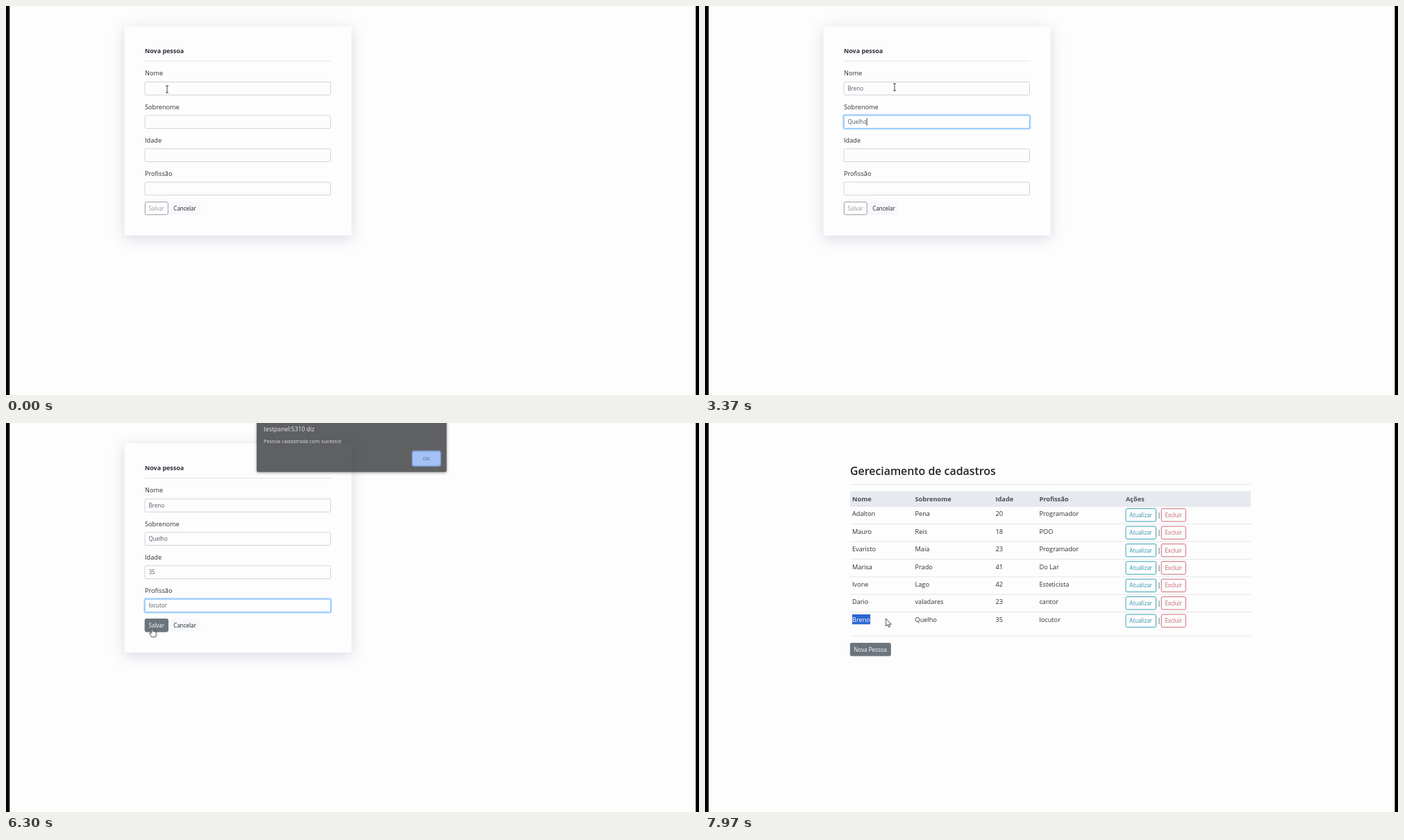
Recreate the animation shown at these times as an HTML page. Size 998 by 561 pixels, loop 8000 ms.

```html
<!DOCTYPE html>
<html lang="pt-BR">
<head>
<meta charset="utf-8">
<title>Nova pessoa</title>
<style>
  html, body { margin: 0; width: 100%; height: 100%; overflow: hidden; background: #fdfdfe; }
  svg { display: block; width: 998px; height: 561px; font: 9.18px "Open Sans", "Noto Sans", sans-serif; fill: #2b3035; }
  .small { font-size: 8.03px; }
  .mid { text-anchor: middle; }
  .bold { font-weight: 700; }
  .line { stroke: #e4e5e9; stroke-width: 1; }
  .card { fill: #fdfdfe; filter: drop-shadow(0 4.9px 9.8px rgba(40, 40, 90, .17)); }
  .popup { fill: #292a2d; filter: drop-shadow(0 1px 2px rgba(0, 0, 0, .5)); }
</style>
</head>
<body>
<svg id="stage" viewBox="0 0 998 561"></svg>
<script>
const LOOP = 8000, SWITCH = 7330;
const stage = document.getElementById('stage');
const tracks = [];

function make(parent, tag, attrs = {}, text) {
  const el = document.createElementNS('http://www.w3.org/2000/svg', tag);
  for (const k in attrs) el.setAttribute(k, attrs[k]);
  if (text !== undefined) el.textContent = text;
  return parent.appendChild(el);
}
const group = (parent, attrs) => make(parent, 'g', attrs);
const box = (parent, x, y, width, height, attrs) => make(parent, 'rect', { x, y, width, height, ...attrs });
const write = (parent, x, y, text, attrs) => make(parent, 'text', { x, y, ...attrs }, text);
const rule = (parent, x1, x2, y) => make(parent, 'line', { x1, x2, y1: y, y2: y, class: 'line' });

// rows: [time, value] pairs for one property; the Map keeps one value per time
function run(el, prop, rows, easing = 'linear') {
  const steps = new Map([[0, rows[0][1]], ...rows, [LOOP, rows[rows.length - 1][1]]]);
  const frames = [...steps].map(([t, v]) => ({ offset: t / LOOP, easing, [prop]: v }));
  const track = el.animate(frames, { duration: LOOP, iterations: Infinity });
  track.pause();
  tracks.push(track);
}
// times: on, off, on, off ...
function show(el, times, prop = 'opacity') {
  run(el, prop, [[0, 0], ...times.map((t, i) => [t, i % 2 ? 0 : 1])], 'step-end');
}

function button(parent, x, y, w, h, label, fill, stroke, color) {
  const g = group(parent);
  box(g, x, y, w, h, { rx: 1.8, fill, stroke });
  write(g, x + w / 2, y + h / 2 + 3, label, { class: 'small mid', fill: color });
  return g;
}

/* ---------- form ---------- */
const form = group(stage);
show(form, [0, SWITCH]);
box(form, 170.5, 29, 327, 302, { class: 'card' });
write(form, 200, 67.6, 'Nova pessoa', { class: 'bold', 'font-size': 8.95 });
rule(form, 200, 468, 79.5);

const fields = [
  { label: 'Nome', value: 'Breno', focus: [970, 2450],
    keys: [1830, 2000, 2100, 2200, 2270], caret: [970, 1270, 1670, 2450] },
  { label: 'Sobrenome', value: 'Quelho', focus: [2450, 3450],
    keys: [2800, 2970, 3030, 3170, 3230, 3330], caret: [2450, 3450] },
  { label: 'Idade', value: '35', focus: [3450, 4560],
    keys: [3970, 4030], caret: [3450, 3770, 3970, 4300] },
  { label: 'Profissão', value: 'locutor', focus: [4560, LOOP],
    keys: [5070, 5130, 5200, 5270, 5330, 5430, 5500], caret: [4560, 4870, 5070, 5730] }
];

fields.forEach((f, i) => {
  const y = 109.6 + i * 48.15;
  write(form, 200, y - 9.2, f.label);
  box(form, 200, y, 267.5, 18.7, { rx: 1.8, fill: '#fdfdfe', stroke: '#ced4da' });

  const ring = group(form, { fill: 'none' });
  box(ring, 199, y - 1, 269.5, 20.7, { rx: 2.4, stroke: '#bfdeff', 'stroke-width': 2 });
  box(ring, 200, y, 267.5, 18.7, { rx: 1.8, stroke: '#80bdff' });
  const [on, off] = f.focus;
  const glow = [[0, 0], [on, 0], [on + 130, 1]];
  if (off < LOOP) glow.push([off, 1], [off + 130, 0]);
  run(ring, 'opacity', glow);

  const text = make(form, 'text', { x: 205.4, y: y + 12.4, class: 'small', fill: '#555b61' });
  [...f.value].forEach((c, n) => show(make(text, 'tspan', {}, c), [f.keys[n]], 'fillOpacity'));

  const caret = box(form, 205.2, y + 4, .9, 11, { fill: '#333' });
  show(caret, f.caret);
  run(caret, 'transform', [[0, 'translateX(0px)'],
    ...f.keys.map((t, n) => [t, `translateX(${text.getSubStringLength(0, n + 1)}px)`])], 'step-end');

  if (f.label === 'Idade') {
    const spin = group(form);
    box(spin, 453.5, y + 3.4, 8.5, 12, { fill: '#eeeef3' });
    make(spin, 'path', { d: `M455.3 ${y + 8}l2.5 -3.2l2.5 3.2z m0 2.8l2.5 3.2l2.5 -3.2z`, fill: '#444' });
    show(spin, f.focus);
  }
});

const save = [form, 200.3, 282.7, 33, 18.2, 'Salvar'];
const idle = button(...save, '#fdfdfe', '#6c757d', '#6c757d');
run(idle, 'opacity', [[0, .72], [5070, .72], [5200, 1]]);
const hot = button(...save, '#6c757d', '#6c757d', '#fff');
run(hot, 'opacity', [[0, 0], [6080, 0], [6200, 1]]);

const cancel = [form, 236.3, 282.7, 42.6, 18.2, 'Cancelar'];
button(...cancel, '#f7f8fb', '#f7f8fb', '#212529');
const over = button(...cancel, '#dfe3e9', '#dae0e5', '#212529');
run(over, 'opacity', [[0, 0], [560, 0], [650, 1], [810, 1], [930, 0]]);

/* ---------- alert ---------- */
const alertBox = group(stage);
run(alertBox, 'opacity', [[0, 0], [6210, 0], [6300, .74], [6400, 1], [SWITCH - 30, 1], [SWITCH, 0]]);
run(alertBox, 'transform', [[0, 'translateY(-10px)'], [6210, 'translateY(-10px)'],
  [6300, 'translateY(-5.2px)'], [6400, 'translateY(0px)']]);
box(alertBox, 361, -10, 273.5, 85.8, { rx: 2, class: 'popup' });
write(alertBox, 371, 16.6, 'testpanel:5310 diz', { 'font-size': 8.65, fill: '#e4e6e9' });
const mark = box(alertBox, 378.8, 24.8, 105.2, 12.2, { fill: '#48648f' });
run(mark, 'clipPath', [[0, 'inset(0 0 0 100%)'], [6770, 'inset(0 0 0 100%)'], [6930, 'inset(0 0 0 0%)']]);
write(alertBox, 371, 33.6, 'Pessoa cadastrada com sucesso!', { 'font-size': 7.4, fill: '#dfe1e5' });
const halo = box(alertBox, 585.5, 45.8, 40, 21, { rx: 2.5, fill: 'none', stroke: '#5b8de0', 'stroke-width': 2 });
show(halo, [0, 6770]);
box(alertBox, 586, 46.5, 39, 19.5, { rx: 2, fill: '#86aef4' });
const pressed = box(alertBox, 586, 46.5, 39, 19.5, { rx: 2, fill: '#7c9fe3' });
show(pressed, [7110]);
write(alertBox, 605.5, 58.8, 'OK', { class: 'mid', 'font-size': 7.2, fill: '#2d3c58' });

/* ---------- table ---------- */
const list = group(stage);
show(list, [SWITCH]);
write(list, 209, 75, 'Gereciamento de cadastros', { 'font-size': 15.9, 'font-weight': 600, fill: '#212529' });
rule(list, 209, 786, 88.5);
box(list, 209, 98.5, 577, 21.8, { fill: '#e6e9ee' });
rule(list, 209, 786, 120.2);

const cols = [212, 302.5, 418.5, 481.5, 606];
['Nome', 'Sobrenome', 'Idade', 'Profissão', 'Ações'].forEach((h, i) =>
  write(list, cols[i], 112.9, h, { class: 'bold', fill: '#495057' }));

const people = [
  ['Adalton', 'Pena', 20, 'Programador'],
  ['Mauro', 'Reis', 18, 'POO'],
  ['Evaristo', 'Maia', 23, 'Programador'],
  ['Marisa', 'Prado', 41, 'Do Lar'],
  ['Ivone', 'Lago', 42, 'Esteticista'],
  ['Dario', 'valadares', 23, 'cantor'],
  ['Breno', 'Quelho', 35, 'locutor']
];
people.forEach((p, i) => {
  const y = 120.2 + i * 25.4;
  if (i) rule(list, 209, 786, y);
  p.forEach((v, n) => write(list, cols[n], y + 14.2, v));
  button(list, 606, y + 3.4, 43.5, 18.4, 'Atualizar', '#fdfdfe', '#3aa3b6', '#3397ab');
  write(list, 651.4, y + 15.6, '|');
  button(list, 657.2, y + 3.4, 35, 18.4, 'Excluir', '#fdfdfe', '#cf6a74', '#c55f69');
});
rule(list, 209, 786, 307);
button(list, 209.3, 317.5, 58, 18.3, 'Nova Pessoa', '#6c757d', '#6c757d', '#fff');

const picked = group(list);
box(picked, 212, 275.8, 26.2, 14.8, { fill: '#2b66d0' });
write(picked, 212, 286.8, 'Breno', { fill: '#fff' });
run(picked, 'clipPath', [[0, 'inset(0 100% 0 0)'], [7770, 'inset(0 100% 0 0)'], [7860, 'inset(0 0% 0 0)']]);

/* ---------- side bars ---------- */
box(stage, 0, 0, 5.3, 561, { fill: '#000' });
box(stage, 993.3, 0, 5, 561, { fill: '#000' });

/* ---------- pointer ---------- */
const shapes = {
  beam: { d: 'M-2 -5H2M0 -5V5M-2 5H2', fill: 'none', stroke: '#333', 'stroke-width': .9 },
  arrow: { d: 'M0 0V11L2.6 8.8L4.3 12.6L6 11.8L4.4 8.2H7.6Z', fill: '#fff', stroke: '#222', 'stroke-width': .85 },
  hand: { d: 'M-1 1Q0 -.8 1 1V5Q4 4.6 6 6V9Q5.8 11 4.8 13H-1Q-2.5 10 -4 8Q-3.6 6 -1 8Z',
    fill: '#fff', stroke: '#222', 'stroke-width': .85 }
};
const path = [
  [0, 232, 120, 'beam'], [370, 232, 120, 'beam'], [440, 236, 170, 'beam'],
  [540, 246, 236, 'arrow'], [590, 254, 283, 'hand'], [640, 256, 304, 'arrow'],
  [700, 262, 290, 'hand'], [750, 268, 255, 'beam'], [800, 275, 214, 'beam'],
  [870, 276, 180, 'beam'], [950, 274, 135, 'beam'], [1030, 273, 117, 'beam'],
  [4230, 273, 117, 'beam'], [4270, 290, 140, 'arrow'], [4320, 330, 205, 'beam'],
  [4360, 345, 229, 'arrow'], [4400, 345, 229.5, 'arrow'], [4440, 345, 258, 'beam'],
  [4500, 340, 284, 'arrow'], [4560, 334, 264, 'beam'], [5870, 334, 264, 'beam'],
  [5970, 290, 276, 'arrow'], [6040, 232, 279, 'arrow'], [6080, 222, 289, 'hand'],
  [6170, 210.5, 295.5, 'hand'], [6370, 210.5, 295.5, 'arrow'], [6520, 330, 170, 'arrow'],
  [6640, 478, 42, 'arrow'], [6670, 487, 31, 'beam'], [6770, 487, 31, 'beam'],
  [6930, 379, 31, 'beam'], [7000, 430, 40, 'arrow'], [7130, 602.5, 53, 'arrow'],
  [7330, 602.5, 53, 'arrow'], [7450, 480, 100, 'arrow'], [7570, 285, 178, 'arrow'],
  [7680, 220, 270, 'beam'], [7730, 212, 284, 'beam'], [7770, 212, 284, 'beam'],
  [7870, 240, 284, 'beam'], [7930, 260.5, 282, 'arrow']
];
const pointer = group(stage);
run(pointer, 'transform', path.map(([t, x, y]) => [t, `translate(${x}px, ${y}px)`]));
for (const kind in shapes) {
  const icon = make(pointer, 'path', shapes[kind]);
  run(icon, 'opacity', path.map(([t, , , k]) => [t, k === kind ? 1 : 0]), 'step-end');
}

// every track is set from the clock; 1 ms of lead keeps steps clear of rounding
function tick(now) {
  const t = (now + 1) % LOOP;
  for (const track of tracks) track.currentTime = t;
  requestAnimationFrame(tick);
}
tick(0);
</script>
</body>
</html>
```
